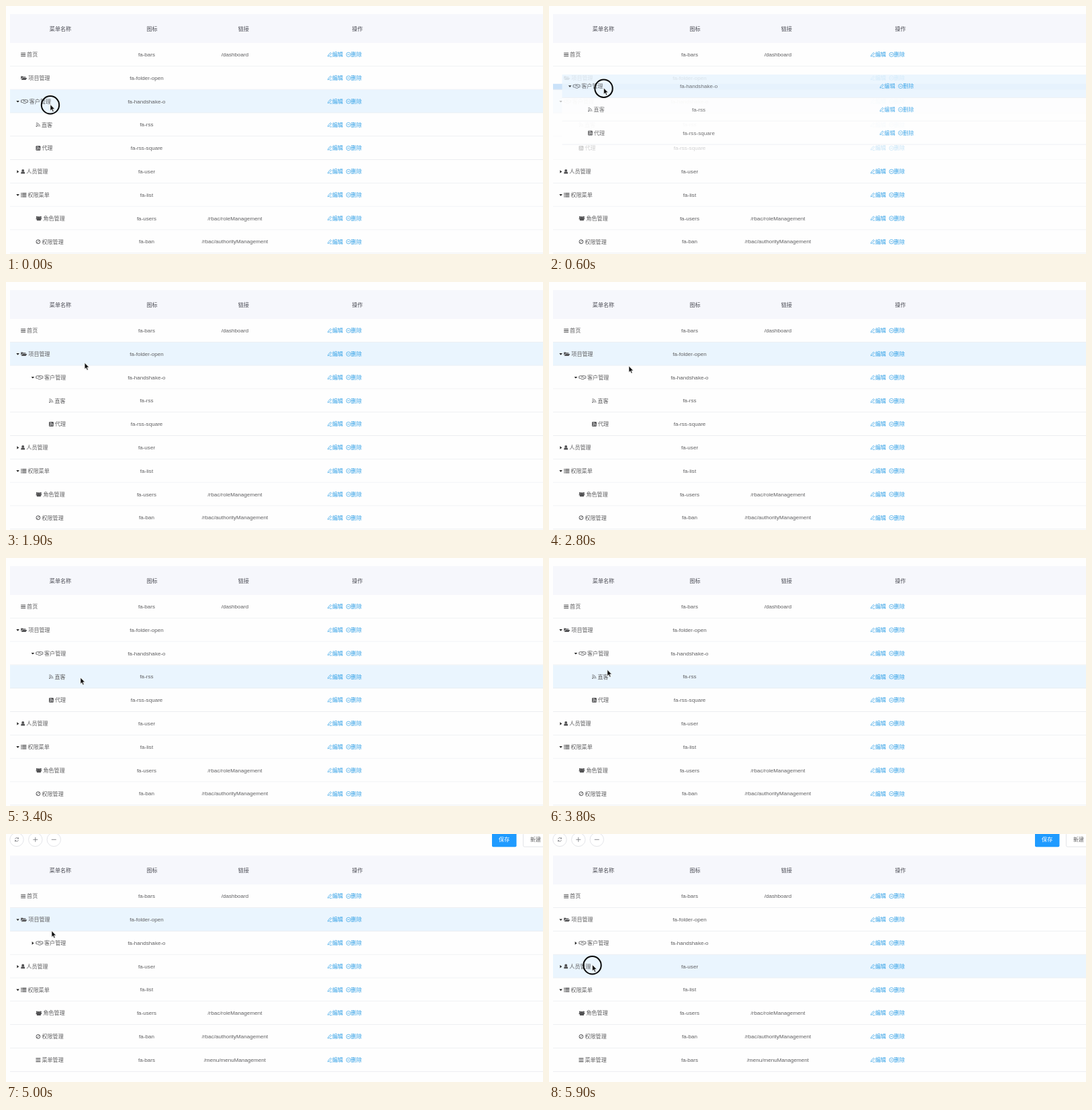
Recreate the animation shown at these times as an HTML page. Size 800 px wide and 369 px high, loop 6 s.

```html
<!DOCTYPE html>
<html lang="zh-CN">
<head>
<meta charset="utf-8">
<title>菜单管理</title>
<style>
html, body { margin: 0; width: 100%; height: 100%; overflow: hidden; background: #fefefe; }
svg { display: block; width: 100vw; height: 100vh; }
text { font: 8.1px "Liberation Sans", "Noto Sans CJK SC", "Noto Sans CJK", sans-serif; fill: #606062; }
.mid { text-anchor: middle; }
.head { font-weight: 500; fill: #4c4d55; }
.link { fill: #2f9fe6; }
.solid { fill: #505052; }
.thin { fill: none; stroke: #505052; stroke-width: .8; stroke-linejoin: round; }
.act { fill: none; stroke: #2f9fe6; stroke-width: .7; stroke-linejoin: round; }
.tool { fill: none; stroke: #707276; stroke-width: .8; }
</style>
</head>
<body>
<svg viewBox="0 0 800 369" preserveAspectRatio="none">
  <g id="page"></g>
  <g id="ghost" opacity=".88"></g>
  <circle id="press" r="13.2" fill="none" stroke="#0a0a0a" stroke-width="2"/>
  <path id="arrow" d="M0 0V9.3L2.1 7.4L3.6 10.9L5.2 10.2L3.7 6.8H6.6Z" fill="#111" stroke="#fff" stroke-width=".6"/>
</svg>
<script>
const LOOP = 6000, PITCH = 34.8, TOP = 55, LEFT = 6, RIGHT = 800;
const DRAG = 300, DROP = 1800, FOLD = 4400;
const INDENT = [22.2, 44.5, 64];
const $ = id => document.getElementById(id);

const solid = d => `<path class="solid" d="${d}"/>`;
const thin = d => `<path class="thin" d="${d}"/>`;
const waves = 'M.4 -.6A3.2 3.2 0 0 1 3.6 2.7M.4 -2.7A5.3 5.3 0 0 1 5.8 2.7';

// each icon: [width, markup], drawn from its left middle
const icons = {
  bars: [7, solid('M0 -2.9h6.9v1.1h-6.9zM0 -.5h6.9v1.1h-6.9zM0 1.9h6.9v1.1h-6.9z')],
  'folder-open': [9.2, solid('M0 2V-2.7h2.8l.7 .8h3.7v1.3H2.3zM.5 2.8L2.5 0h6.7L7.3 2.8z')],
  'handshake-o': [10.6, thin('M.3 -1.7L2 -2.1L4 -2.6L5.2 -2.1L6.6 -2.6L8.7 -2L10.3 -1.7V1.3L8.7 1.5L6.5 3L4.7 2.8L2 1.4L.3 1.3ZM5.2 -2.1L3.8 -.3Q4.7 .7 6 -.7L8.5 1.4')],
  rss: [6.6, thin(waves) + '<circle class="solid" cx="1" cy="2.1" r=".9"/>'],
  'rss-square': [7, '<rect class="solid" y="-3.4" width="6.9" height="6.9" rx="1.2"/>' +
    '<g transform="translate(1 -.1) scale(.83)"><path d="' + waves + '" fill="none" stroke="#fff" stroke-width=".9"/><circle cx="1" cy="2.1" r=".9" fill="#fff"/></g>'],
  user: [6.2, '<circle class="solid" cx="3" cy="-1.5" r="1.9"/>' + solid('M0 3.2Q-.1 .2 1.5 -.1Q3 1 4.5 -.1Q6.1 .2 6 3.2z')],
  list: [8.3, solid([-3, -1.2, .6, 2.4].map(y => `M0 ${y}h1.4v1.1h-1.4zM2 ${y}h6.2v1.1h-6.2z`).join(''))],
  users: [9, [[1.7, -1.9, 1.3], [7.1, -1.9, 1.3], [4.4, -1, 1.8]].map(([x, y, r]) =>
    `<circle class="solid" cx="${x}" cy="${y}" r="${r}"/>`).join('') +
    solid('M0 1.4Q0 -.7 1.2 -.6H7.6Q8.8 -.7 8.8 1.4H7.5L7.4 3.4H1.4L1.3 1.4z')],
  ban: [7, '<circle class="thin" cx="3.4" cy="0" r="2.9" style="stroke-width:1"/>' + thin('M1.4 2L5.4 -2')]
};

const item = (name, icon, link = '') => ({ name, icon, link });
const home = item('首页', 'bars', '/dashboard');
const project = item('项目管理', 'folder-open');
const client = item('客户管理', 'handshake-o');
const direct = item('直客', 'rss');
const agent = item('代理', 'rss-square');
const staff = item('人员管理', 'user');
const rights = item('权限菜单', 'list');
const tail = [
  [staff, 0, 'right'], [rights, 0, 'down'],
  [item('角色管理', 'users', '/rbac/roleManagement'), 1],
  [item('权限管理', 'ban', '/rbac/authorityManagement'), 1],
  [item('菜单管理', 'bars', '/menu/menuManagement'), 1]
];
const family = [[client, 0, 'down'], [direct, 1], [agent, 1]];
const before = [[home, 0], [project, 0], ...family, ...tail];
const nested = [[home, 0], [project, 0, 'down'], [client, 1, 'down'], [direct, 2], [agent, 2], ...tail];
const folded = [[home, 0], [project, 0, 'down'], [client, 1, 'right'], ...tail];

const text = (x, y, s, cls = '') => `<text x="${x}" y="${y}" class="${cls}">${s}</text>`;
const at = (x, y, body) => `<g transform="translate(${x} ${y})">${body}</g>`;

function actions(y) {
  return at(479, y, '<path class="act" d="M.5 2.7L1.1 .7L4.3 -3L5.8 -1.7L2.5 2.1ZM3.2 3.1H6.3"/>') +
    text(486, y + 2.9, '编辑', 'link') +
    `<circle class="act" cx="510.2" cy="${y}" r="3.2"/><path class="act" d="M508.5 ${y}h3.4"/>` +
    text(513.8, y + 2.9, '删除', 'link');
}

function row([it, level, caret], i, lit, strip) {
  const y0 = TOP + i * PITCH, y = y0 + 17.3, x = INDENT[level];
  const [w, art] = icons[it.icon];
  const tri = { down: 'M-2.3 -1.2H2.3L0 1.5Z', right: 'M-1.2 -2.3V2.3L1.6 0Z' }[caret];
  const width = RIGHT - LEFT;
  return `<rect x="${LEFT}" y="${y0}" width="${width}" height="${PITCH}" fill="${lit ? '#eaf5fe' : '#fefefe'}"/>` +
    (strip ? `<rect x="${LEFT}" y="${y0 + 26}" width="${width}" height="8.8" fill="#cbe2f9"/>` : '') +
    `<rect x="${LEFT}" y="${y0 + PITCH - .8}" width="${width}" height=".8" fill="#e8eaee"/>` +
    (tri ? at(x - 4.6, y + .2, `<path d="${tri}" fill="#222"/>`) : '') +
    at(x, y, art) + text(x + w + 1.9, y + 2.9, it.name) +
    text(209.5, y + 2.7, 'fa-' + it.icon, 'mid') +
    text(341, y + 2.7, it.link, 'mid') + actions(y);
}

const heads = [[81, '菜单名称'], [217.5, '图标'], [354, '链接'], [523.5, '操作']];
const header = `<rect x="${LEFT}" y="12" width="${RIGHT - LEFT}" height="43" fill="#f6f7fc"/>` +
  heads.map(([x, s]) => text(x, 36.5, s, 'mid head')).join('');

// sits above the stage until the page moves down
const toolbar = [16, 43.8, 71.3].map(x =>
  `<circle cx="${x}" cy="-12" r="10.2" fill="#fff" stroke="#dcdee2" stroke-width=".8"/>`).join('') +
  '<path class="tool" d="M13.5 -12.8A2.7 2.7 0 0 1 18.3 -13.5M18.5 -11.2A2.7 2.7 0 0 1 13.7 -10.5M18.5 -15V-13.3H16.9M13.5 -9V-10.7H15.1M40.3 -12h7M43.8 -15.5v7M67.8 -12h7"/>' +
  '<rect x="724" y="-22" width="36.5" height="21" rx="2" fill="#1f9bff"/>' +
  '<text x="742.2" y="-9" class="mid" style="fill:#fff">保存</text>' +
  '<rect x="770.5" y="-22" width="37" height="20.7" rx="2" fill="#fff" stroke="#dcdee2" stroke-width=".8"/>' +
  text(789, -9, '新建', 'mid');

// time, x, y of the pointer tip
const path = [
  [0, 66, 146.5], [200, 66, 146.5], [DRAG, 68, 144.5], [700, 86, 114.5], [1200, 102, 114.5],
  [1400, 115.5, 114.5], [DROP, 117, 120], [2200, 117.5, 121], [2800, 119, 125],
  [3100, 118, 150], [3400, 111, 178], [3600, 106, 177], [3800, 87, 166.3],
  [4200, 40.5, 142], [FOLD, 40, 142], [4700, 67.5, 143], [5000, 68, 144],
  [5500, 64.5, 194.5], [LOOP, 64.5, 194.5]
];
function pointer(t) {
  const k = path.findIndex(p => p[0] > t);
  const [t0, x0, y0] = path[k - 1], [t1, x1, y1] = path[k];
  const u = (t - t0) / (t1 - t0);
  return [x0 + (x1 - x0) * u, y0 + (y1 - y0) * u];
}

const holds = [[0, DROP], [4250, FOLD], [5700, LOOP]];
const within = (t, [a, b]) => t >= a && t < b;

$('ghost').innerHTML = family.map((r, i) => row(r, i + 2, i === 0)).join('');
let shown = '';

function draw(t) {
  const [x, y] = pointer(t);
  const drag = within(t, [DRAG, DROP]);
  const rows = t < DROP ? before : t < FOLD ? nested : folded;
  const shift = t < FOLD ? 0 : 20.3;
  const over = Math.floor((y - 1 - TOP - shift) / PITCH);
  const strip = drag && over === 1;
  const hover = drag ? 2 : over;
  const key = [drag, rows.length, t < DROP, strip, hover].join();
  if (key !== shown) {
    shown = key;
    const body = rows.map((r, i) => {
      const s = row(r, i, i === hover, strip && i === 1);
      return drag && family.includes(r) ? `<g opacity=".28">${s}</g>` : s;
    }).join('');
    $('page').innerHTML = at(0, shift, toolbar + header + body);
  }
  $('ghost').style.display = drag ? '' : 'none';
  $('ghost').setAttribute('transform', `translate(${x - 68} ${y - 144.5})`);
  $('press').style.display = holds.some(h => within(t, h)) ? '' : 'none';
  $('press').setAttribute('transform', `translate(${x} ${y + .8})`);
  $('arrow').setAttribute('transform', `translate(${x} ${y})`);
}

const start = performance.now();
function tick() {
  draw((performance.now() - start) % LOOP);
  requestAnimationFrame(tick);
}
tick();
</script>
</body>
</html>
```
